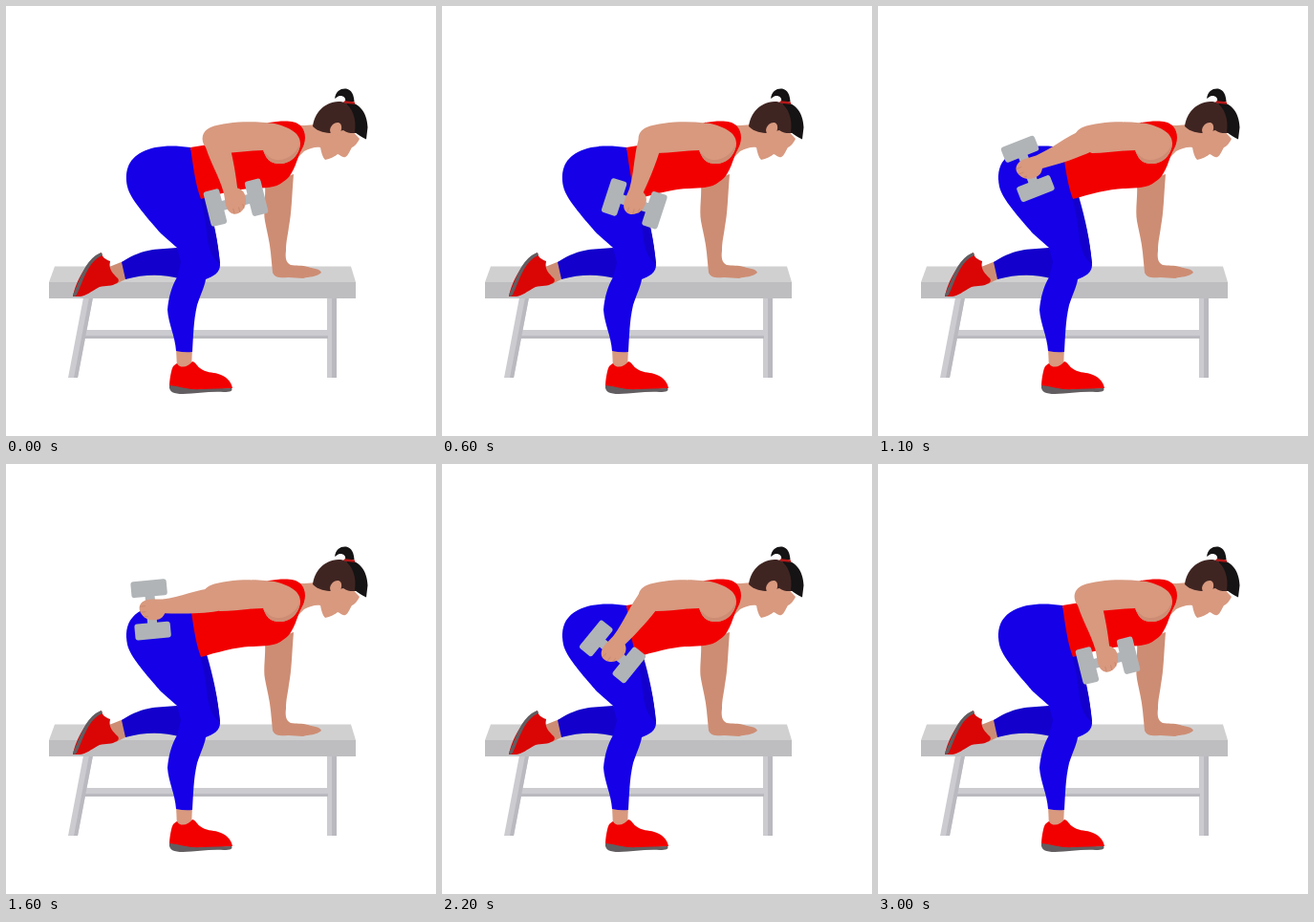
An HTML page that plays this animation: 450x450 px, repeating every 3100 ms.

```html
<!DOCTYPE html>
<html lang="en">
<head>
<meta charset="utf-8">
<title>Dumbbell kickback</title>
<style>
  html, body { margin: 0; width: 100%; height: 100%; overflow: hidden; background: #fff; }
  svg { display: block; width: 100vw; height: 100vh; }
  .skin { fill: #d8997f; }
  .skin-far { fill: #cd8d74; }
  .red { fill: #f20000; }
  .red-far { fill: #da0606; }
  .blue { fill: #1500e8; }
  .blue-far { fill: #1300cc; }
  .steel { fill: #b0b4b7; }
  .sole { fill: #625d60; }
  .line { fill: none; stroke-linecap: round; }
</style>
</head>
<body>
<svg viewBox="0 0 450 450">
  <g id="bench">
    <path fill="#cbcbd0" d="M81 305H91L75 389H65ZM336 305H346V389H336ZM80 339H337V348H78Z"/>
    <path fill="#b9b9bf" d="M87 305H91L75 389H71ZM341 305H346V389H341ZM80 345H337V348H79Z"/>
    <path fill="#d0d0d1" d="M51 272.5H361L366 289H45Z"/>
    <path fill="#bebec1" d="M45 289H366V306H45Z"/>
  </g>

  <path class="skin-far" d="M271 186C272 200 269 214 271 225C273 236 276 247 277 258L279 279C281 284 287 285 295 284L311 285C317 283 325 284 330 279C329 275 322 275 316 273C310 271 303 272 298 271C293 269 292 263 293 256C293 246 295 240 296 231C299 216 299 200 301 176Z"/>

  <g id="legs">
    <path class="skin-far" d="M108 273L123 267L127 285L115 291Z"/>
    <path class="red-far" d="M100 258C100 262 103 265 109 267C107 276 112 280 117 285C119 288 117 290 114 291C109 294 101 292 96 295C89 299 84 303 78 304L70 304C73 288 85 266 100 258Z"/>
    <path class="line" stroke="#625d60" stroke-width="3.5" d="M72 302C78 291 83 267 99 260"/>
    <path class="skin" d="M178 358H195L194 380H179Z"/>
    <path class="red" d="M179 374C182 380 191 378 195 372C199 373 200 377 203 379C209 384 216 383 222 385C230 387 236 393 237 400L205 403L171 399C171 391 173 380 175 377Q177 375 179 374Z"/>
    <path class="sole" d="M171 397C183 398 190 402 205 401L236 400C238 403 234 404 228 404C212 403 200 406 185 406C176 406 170 404 171 397Z"/>
    <path class="blue-far" d="M179 253C160 255 146 252 121 268L125 286C145 281 162 280 184 286L190 266Z"/>
    <path class="blue" d="M193 148C174 145 154 146 142 153C127 161 124 174 127 189C130 203 152 226 162 238L179 253L183 268L179 284C173 294 170 306 169 318C170 333 177 345 178 361Q187 363 195 362C196 348 196 330 200 313C204 301 208 293 209 286C217 283 224 279 224 271C222 246 216 222 209 198Z"/>
    <path class="blue-far" d="M203 201L210 199C217 223 222 246 224 270C216 265 213 256 211 245C209 229 208 216 203 201Z"/>
  </g>

  <g id="torso">
    <path class="skin" d="M286 122C301 124 313 127 326 123L345 112L370 139C368 143 365 147 362 148C360 151 358 157 355 158C352 159 350 156 347 155C345 157 339 160 334 161C331 158 330 153 329 148C324 147 318 149 312 152L300 164Z"/>
    <path class="red" d="M193 148L230 142L275 122C288 120 302 119 308 125C315 132 314 143 309 151C304 160 302 177 290 184C282 191 270 190 259 191C243 191 222 197 204 202C198 186 196 168 193 148Z"/>
  </g>

  <g id="head">
    <path fill="#3f2522" d="M321 126C323 112 332 101 348 100C360 100 368 110 369 133C363 133 358 134 353 130L341 133C335 133 327 132 321 126Z"/>
    <path fill="#151314" d="M353 100C368 99 378 110 378.5 127L377 139.5C373 138 369 135 365 132C367 119 363 106 353 100Z"/>
    <path fill="#151314" d="M344 97C345 89 350 86 356 86.5C362 88 364 93 364.5 100H355C356 96 353 94 350 94C347 94 346 96 344 97Z"/>
    <path class="line" stroke="#b51717" stroke-width="2.5" d="M355 100.5L364 101.5"/>
    <path class="skin" d="M339 130C340 124 345 121 349 122.5C352 124 352 131 348 134L341 139Z"/>
  </g>

  <path class="skin" d="M281 123C257 120 230 121 214 127C205 131 203 140 209 148L224 154C240 154 255 151 269 151C271 155 273 164 284 165C297 166 307 157 308 144C308 133 297 127 281 123Z"/>
  <path class="skin-far" d="M269 151C271 155 273 164 284 165C297 166 307 157 308 144C304 154 295 161 285 161C277 161 273 156 269 151Z"/>

  <g id="forearm">
    <path class="steel" d="M-20 64H20V74H-20Z"/>
    <rect class="steel" x="-30.5" y="50.5" width="17" height="37.5" rx="3"/>
    <rect class="steel" x="14" y="50.5" width="17" height="37.5" rx="3"/>
    <path class="skin" d="M-16.5 0C-16.5 -16 6 -16 8 0C9 15 8 36 5.5 55C9 57 11.5 60 11.5 65C11.5 73 8 79 0 81C-7 82 -11 76 -10.5 68L-9.5 56C-10 37 -16.5 20 -16.5 0Z"/>
    <path class="line" stroke="#c48468" stroke-width=".7" d="M-4 80V75M2 80V75M7 77V73"/>
  </g>
</svg>
<script>
  const forearm = document.getElementById("forearm");
  const STEP = 100, STEPS = 31;

  function draw(now) {
    const step = Math.floor(now / STEP) % STEPS;
    const swing = (1 - Math.cos(2 * Math.PI * step / (STEPS - 1))) / 2;
    const lift = swing ** 1.07;
    const x = 223.5 - 3 * lift, y = 138.5 + 7.5 * lift, angle = -14 + 100 * lift;
    forearm.setAttribute("transform", `translate(${x} ${y}) rotate(${angle})`);
  }

  const start = performance.now();
  function tick() {
    draw(performance.now() - start);
    requestAnimationFrame(tick);
  }
  tick();
</script>
</body>
</html>
```
